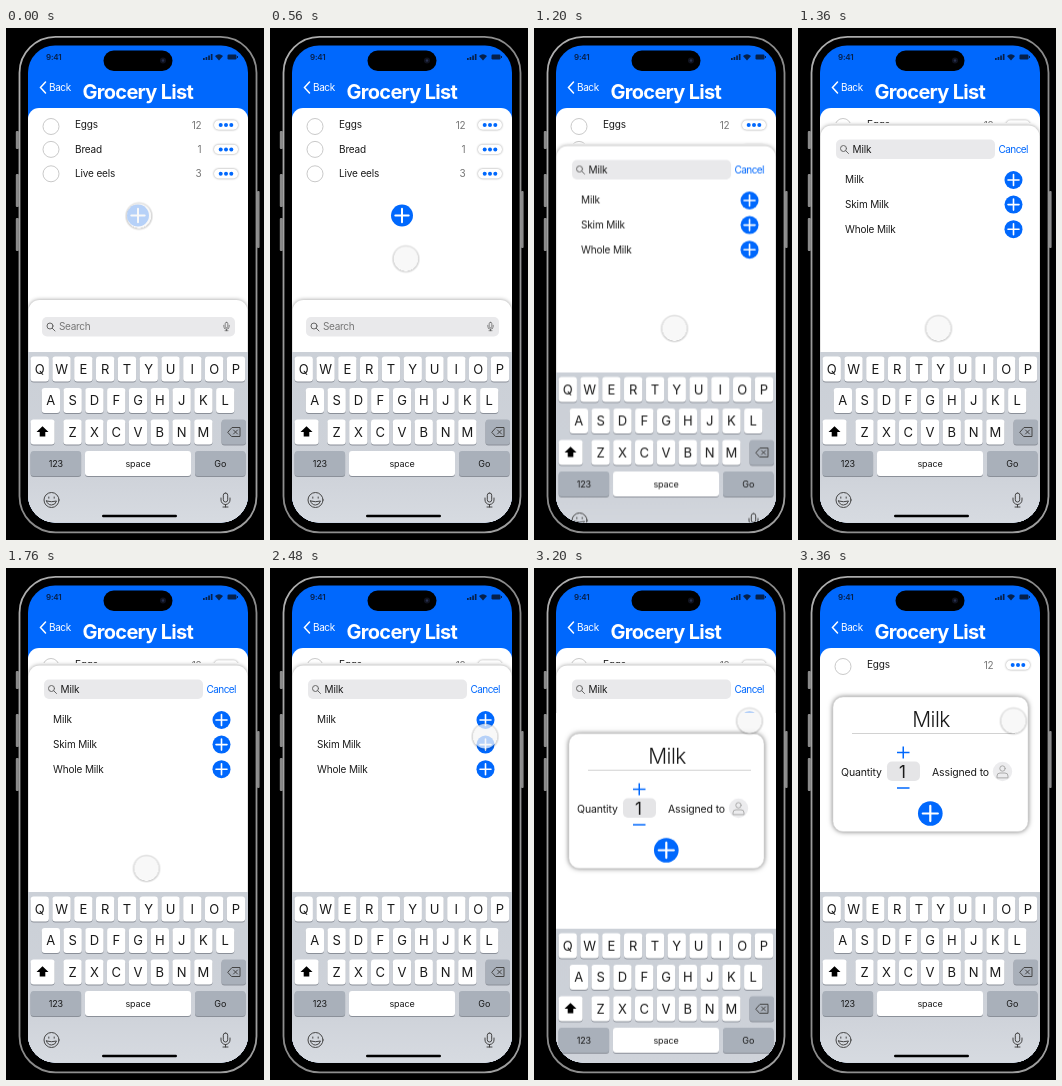
An HTML page that plays this animation: 258 px wide and 512 px high, repeating every 3440 ms.

```html
<!DOCTYPE html>
<html lang="en">
<head>
<meta charset="utf-8">
<title>Grocery list</title>
<style>
  html, body { margin: 0; width: 100%; height: 100%; overflow: hidden; background: #000; }
  svg { display: block; width: 258px; height: 512px; }
  text { font: 10px Inter, "Liberation Sans", sans-serif; letter-spacing: -.15px; fill: #1a1a1a; }
  .mid { text-anchor: middle; }
  .end { text-anchor: end; fill: #777; }
  .blue { fill: #0068fd; }
  .line { fill: none; stroke: #444; stroke-linecap: round; }
  .raised { filter: drop-shadow(0 0 2px #0006); }
  .soft { filter: drop-shadow(0 .5px 1px #0006); }
  .letter { font-size: 13px; letter-spacing: 0; }
  .small { font-size: 9px; }

  .sheet, .card, .touch, .touch g { animation: 3440ms linear infinite; }
  .sheet { animation-name: sheet; }
  .card { animation-name: card; }
  .touch { animation-name: touch-x; }
  .touch g { animation-name: touch-y; }

  @keyframes sheet {
    0% { transform: translateY(405px); }
    28.99% { transform: translateY(405px); animation-timing-function: cubic-bezier(0, 0, .58, 1); }
    36.2%, 94.88% { transform: none; }
    94.89%, 100% { transform: translateY(405px); }
  }
  @keyframes card {
    0% { transform: translateY(388px); }
    87.62% { transform: translateY(388px); animation-timing-function: cubic-bezier(0, 0, .58, 1); }
    94.88%, 100% { transform: none; }
  }
  @keyframes touch-x {
    0% { transform: translateX(133px); }
    9.3% { transform: translateX(133px); animation-timing-function: ease-in-out; }
    25.6% { transform: translateX(140.5px); }
    55.8% { transform: translateX(140.5px); animation-timing-function: ease-in-out; }
    73%, 100% { transform: translateX(215.5px); }
  }
  @keyframes touch-y {
    0% { transform: translateY(187.5px); }
    9.3% { transform: translateY(187.5px); animation-timing-function: ease-in-out; }
    25.6% { transform: translateY(300px); }
    55.8% { transform: translateY(300px); animation-timing-function: ease-in-out; }
    76.9%, 100% { transform: translateY(152.5px); }
  }
</style>
</head>
<body>
<svg viewBox="0 0 258 512">
  <defs>
    <clipPath id="screen"><rect x="22" y="17.500" width="220" height="477" rx="27"/></clipPath>
    <linearGradient id="tray" x2="0" y2="1">
      <stop offset="0" stop-color="#cbd0d7"/>
      <stop offset=".7" stop-color="#ced2d9"/>
      <stop offset="1" stop-color="#d7dbe1"/>
    </linearGradient>
    <linearGradient id="rim" x2="1" y2="1">
      <stop offset="0" stop-color="#b0b0b0"/>
      <stop offset=".5" stop-color="#8a8a8a"/>
      <stop offset="1" stop-color="#a0a0a0"/>
    </linearGradient>
    <radialGradient id="halo">
      <stop offset=".82" stop-color="#000" stop-opacity="0"/>
      <stop offset=".84" stop-color="#000" stop-opacity=".2"/>
      <stop offset="1" stop-color="#000" stop-opacity="0"/>
    </radialGradient>
    <g id="plus">
      <circle r="9" class="blue"/>
      <path d="M-5.500 0H5.500M0-5.500V5.500" stroke="#fff" stroke-width="1.600" stroke-linecap="round"/>
    </g>
    <g id="lens" class="line" style="stroke:#666"><circle r="3"/><path d="M2.200 2.200L5 5"/></g>
    <g id="mic" class="line">
      <rect x="-2.200" y="-7" width="4.400" height="9" rx="2.200"/>
      <path d="M-4.500-2V0a4.500 4.500 0 0 0 9 0V-2M0 4.500V7M-2.500 7H2.500"/>
    </g>
    <g id="keyboard">
      <rect x="22" y="324" width="220" height="172" fill="url(#tray)"/>
      <g id="keys"></g>
      <path d="M36.500 398.200L42.500 404H39.300V408.500H33.700V404H30.500Z"/>
      <path d="M222 404L226 399.500H234V408.500H226ZM227.500 402L231.500 406M231.500 402L227.500 406" class="line"/>
      <g class="line" transform="translate(45.500 472)">
        <circle r="7.500"/>
        <path d="M-2.700-3V-1.800M2.700-3V-1.800M-5 1Q0 2.500 5 1Q3.800 5 0 5Q-3.800 5-5 1Z"/>
      </g>
      <use href="#mic" x="219.500" y="472"/>
      <rect x="96" y="486.800" width="75" height="2.400" rx="1.200"/>
    </g>
  </defs>

  <rect width="258" height="512"/>
  <g fill="#8a8a8a">
    <rect x="9.800" y="103" width="3" height="18" rx="1"/>
    <rect x="9.800" y="146" width="3" height="33" rx="1"/>
    <rect x="9.800" y="190" width="3" height="33" rx="1"/>
    <rect x="251" y="163" width="2.600" height="57" rx="1"/>
  </g>
  <rect x="13.500" y="8.800" width="237" height="495.500" rx="36" stroke="url(#rim)" stroke-width="1.800"/>

  <g clip-path="url(#screen)">
    <rect x="22" y="17" width="220" height="478" class="blue"/>
    <text x="40" y="32" style="font-size:8px;font-weight:600;fill:#06204a">9:41</text>
    <g fill="#06204a">
      <path d="M197 32V30h1.700v2zM199.600 32V29h1.700v3zM202.200 32V27.500h1.700V32zM204.800 32V26h1.700v6z"/>
      <path d="M209 28Q213 24.500 217 28L213 32.500Z"/>
      <rect x="221.500" y="26.500" width="9" height="5" rx="1.200"/>
      <rect x="231" y="28" width="1" height="2"/>
    </g>
    <path d="M39.500 54L34.500 59.500L39.500 65" fill="none" stroke="#fff" stroke-width="1.500" stroke-linecap="round"/>
    <text x="43" y="63" style="fill:#fff;letter-spacing:-.4px">Back</text>
    <text x="76.500" y="71" style="font-size:20px;font-weight:700;fill:#fff;letter-spacing:-.7px">Grocery List</text>

    <rect x="22" y="80" width="220" height="430" rx="11" fill="#fff"/>
    <g id="list"></g>
    <use href="#plus" transform="translate(132 187.500) scale(1.220)"/>

    <rect x="22.500" y="272" width="219" height="240" rx="11" fill="#fff" class="raised"/>
    <rect x="36" y="289" width="193" height="19.500" rx="5" fill="#e9e9eb"/>
    <use href="#lens" x="44" y="298"/>
    <text x="53" y="302.300" style="fill:#777;letter-spacing:-.3px">Search</text>
    <use href="#mic" transform="translate(220.500 298.500) scale(.6)"/>
    <use href="#keyboard"/>

    <g class="sheet">
      <rect x="22" y="95" width="220" height="420" fill="#fff"/>
      <rect x="22.500" y="97.500" width="219" height="420" rx="11" fill="#fff" class="raised"/>
      <rect x="38" y="111.500" width="159" height="19.500" rx="5" fill="#e9e9eb"/>
      <use href="#lens" x="45.500" y="120.500"/>
      <text x="54.500" y="125">Milk</text>
      <text x="200.500" y="125" class="blue" style="letter-spacing:-.55px">Cancel</text>
      <g id="results"></g>
      <use href="#keyboard"/>
    </g>

    <g class="card">
      <rect x="22" y="108" width="220" height="390" fill="#fff"/>
      <rect x="35" y="129" width="195" height="134.500" rx="10" fill="#fff" stroke="#ddd" stroke-width=".6" style="filter:drop-shadow(0 0 2.500px #0008)"/>
      <text x="133" y="158.500" class="mid" style="font-size:21px;font-weight:300;letter-spacing:-.6px">Milk</text>
      <path d="M54 165.500H217" stroke="#d2d2d2"/>
      <text x="43" y="207.500" style="font-size:10.500px">Quantity</text>
      <text x="134" y="207.500" style="font-size:10.500px">Assigned to</text>
      <rect x="89" y="193.500" width="33" height="19.500" rx="5" fill="#e5e5e7"/>
      <text x="104.500" y="209.500" class="mid" style="font-size:17px">1</text>
      <path d="M99 184.500H111.500M105.250 178.500V190.500M99 220H111.500" stroke="#0068fd" stroke-width="1.500"/>
      <circle cx="204.500" cy="203.500" r="9.700" fill="#ececee"/>
      <g class="line" style="stroke:#aaa">
        <circle cx="204.500" cy="200.500" r="2.700"/>
        <path d="M199 209.500V208Q199 205 202 205H207Q210 205 210 208V209.500Z"/>
      </g>
      <use href="#plus" transform="translate(132.300 245.500) scale(1.370)"/>
      <use href="#keyboard"/>
    </g>

    <g class="touch"><g>
      <circle cy=".6" r="14.500" fill="url(#halo)"/>
      <circle r="12.300" fill="#f6f6f6" fill-opacity=".74"/>
    </g></g>
  </g>

  <rect x="97.500" y="22.500" width="69" height="20.500" rx="10.250"/>
  <circle cx="157" cy="32.500" r="3" fill="#10131f"/>
  <circle cx="157" cy="32.500" r="1.200" fill="#27304f"/>
</svg>
<script>
  const fill = (id, html) => { document.getElementById(id).innerHTML = html; };

  function key(x, y, w, label, cls = "letter", color = "#fff") {
    const rect = (dy, c) => `<rect x="${x}" y="${y + dy}" width="${w}" height="25" rx="3" fill="${c}"/>`;
    const baseline = y + (cls === "letter" ? 17.3 : 16);
    return rect(1, "#8b9099") + rect(0, color) +
      `<text x="${x + w / 2}" y="${baseline}" class="mid ${cls}">${label}</text>`;
  }

  const pitch = 21.8, gray = "#a9b0ba";
  const row = (letters, x, y) =>
    [...letters].map((c, i) => key(x + i * pitch, y, 18.3, c)).join("");

  fill("keys",
    row("QWERTYUIOP", 24.6, 328.5) + row("ASDFGHJKL", 35.7, 360) + row("ZXCVBNM", 57.4, 391.5) +
    key(24.6, 391.5, 24, "") + key(215.5, 391.5, 24.5, "", "small", gray) +
    key(24.6, 423, 50.5, "123", "small", gray) + key(79, 423, 106, "space", "small") +
    key(189, 423, 50.5, "Go", "small", gray));

  fill("list", [["Eggs", 12], ["Bread", 1], ["Live eels", 3]].map(([name, count], i) => {
    const y = 97 + i * 24.4;
    const dots = [214.7, 220, 225.3].map(x => `<circle cx="${x}" cy="${y}" r="2" class="blue"/>`).join("");
    return `<circle cx="45" cy="${y + (i ? 0 : 1.5)}" r="8" fill="#fff" stroke="#bbb" stroke-width=".8"/>
      <text x="69" y="${y + 3.3}">${name}</text>
      <text x="195.500" y="${y + 3.5}" class="end">${count}</text>
      <rect x="208" y="${y - 4.7}" width="24" height="9.400" rx="4.700" fill="#fff" class="soft"/>${dots}`;
  }).join(""));

  fill("results", ["Milk", "Skim Milk", "Whole Milk"].map((name, i) => {
    const y = 152 + i * 24.6;
    return `<text x="47" y="${y + 3.3}">${name}</text><use href="#plus" x="215.500" y="${y}"/>`;
  }).join(""));
</script>
</body>
</html>
```
